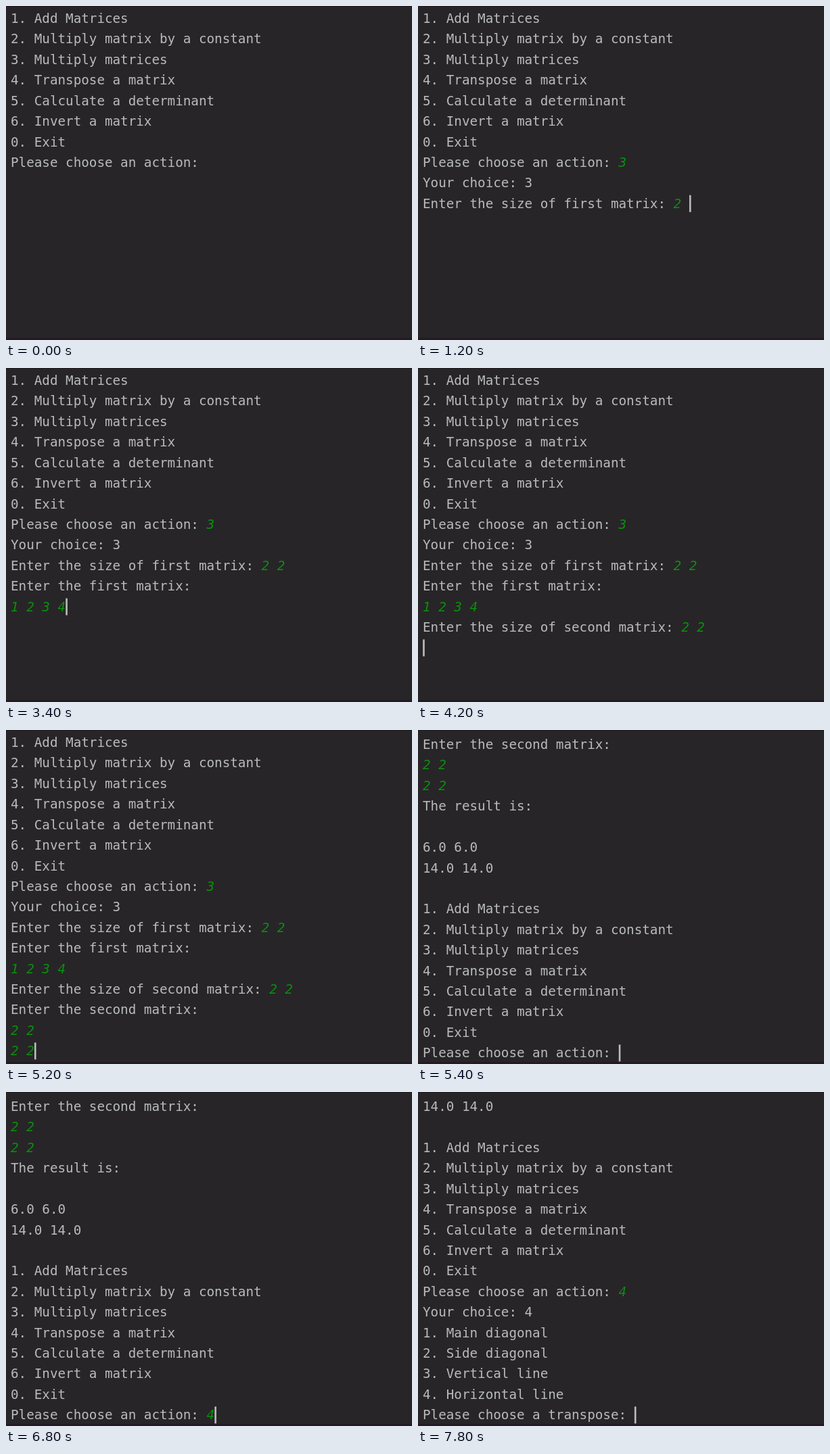
Animation of 600 by 494 pixels, one loop 8000 ms. Source, as an HTML page:

```html
<!DOCTYPE html>
<html lang="en">
<head>
<meta charset="utf-8">
<title>Matrix console</title>
<style>
  html, body { margin: 0; width: 100%; height: 100%; overflow: hidden; background: #272528; }
  svg { display: block; width: 600px; height: 494px; }
  text { font: 19.24px "DejaVu Sans Mono", "Noto Sans Mono", monospace; fill: #b9babb; white-space: pre; }
  .input { fill: #0a900c; font-style: italic; }
</style>
</head>
<body>
<svg viewBox="0 0 600 494">
  <rect width="600" height="494" fill="#272528"/>
  <rect width="600" height="1" fill="#1d1b1e"/>
  <rect y="491" width="600" height="3" fill="#231a24"/>
  <g id="screen"></g>
  <rect id="caret" width="2.6" height="25" fill="#bcbdbe"/>
</svg>
<script>
const LOOP = 8000, LEFT = 7, CELL = 11.58, LINE = 30.42, ROWS = 16;

const MENU = `1. Add Matrices
2. Multiply matrix by a constant
3. Multiply matrices
4. Transpose a matrix
5. Calculate a determinant
6. Invert a matrix
0. Exit
Please choose an action: `;

const RESULT = `The result is:

6.0 6.0
14.0 14.0

`;

const TRANSPOSE = `Your choice: 4
1. Main diagonal
2. Side diagonal
3. Vertical line
4. Horizontal line
Please choose a transpose: `;

const print = (at, text) => ({ at, text, input: false });
const type = (at, text) => ({ at, text, input: true });

const session = [
  print(0, MENU),
  type(600, "3"),
  print(800, "\nYour choice: 3\nEnter the size of first matrix: "),
  type(1000, "2"), type(1200, " "), type(1400, "2"),
  print(1600, "\nEnter the first matrix:\n"),
  type(2200, "1"), type(2400, " "), type(2600, "2"), type(2800, " "),
  type(3000, "3"), type(3200, " "), type(3400, "4"),
  print(3600, "\nEnter the size of second matrix: "),
  type(4000, "2 "), type(4200, "2\n"),
  print(4400, "Enter the second matrix:\n"),
  type(4600, "2 "), type(4800, "2"), type(5000, "\n2 "), type(5200, "2"),
  print(5400, "\n" + RESULT + MENU),
  type(6600, "4"),
  print(7000, "\n" + TRANSPOSE)
];

// Half-open spans in which the blinking caret is hidden.
const caretOff = [[0, 200], [6000, 6400], [7400, 7800]];

const screen = document.getElementById("screen");
const caret = document.getElementById("caret");

function svg(name, attrs, parent) {
  const node = document.createElementNS("http://www.w3.org/2000/svg", name);
  for (const key in attrs) node.setAttribute(key, attrs[key]);
  return parent.appendChild(node);
}

// Splits everything written so far into lines of positioned runs.
function linesAt(time) {
  const lines = [{ runs: [], length: 0 }];
  for (const { at, text, input } of session) {
    if (at > time) break;
    text.split("\n").forEach((part, i) => {
      if (i) lines.push({ runs: [], length: 0 });
      const line = lines[lines.length - 1];
      if (part.trim()) line.runs.push({ part, input, column: line.length });
      line.length += part.length;
    });
  }
  return lines;
}

function draw(time) {
  const lines = linesAt(time);
  const first = Math.max(0, lines.length - ROWS);
  const top = first ? 28 : 25;
  const baseline = row => top + (row - first) * LINE;

  screen.replaceChildren();
  lines.forEach((line, row) => {
    if (row < first) return;
    for (const { part, input, column } of line.runs) {
      const text = svg("text", {
        x: LEFT + column * CELL,
        y: baseline(row),
        class: input ? "input" : "output"
      }, screen);
      text.textContent = part;
    }
  });

  const last = lines.length - 1;
  const hidden = caretOff.some(([from, to]) => time >= from && time < to);
  caret.setAttribute("x", LEFT + lines[last].length * CELL + 0.2);
  caret.setAttribute("y", baseline(last) - 19);
  caret.setAttribute("visibility", hidden ? "hidden" : "visible");
}

const start = performance.now();
let shown = -1;

function frame() {
  const elapsed = (performance.now() - start) % LOOP;
  const step = Math.floor(elapsed / 200) * 200;
  if (step !== shown) draw(shown = step);
  requestAnimationFrame(frame);
}
frame();
</script>
</body>
</html>
```
